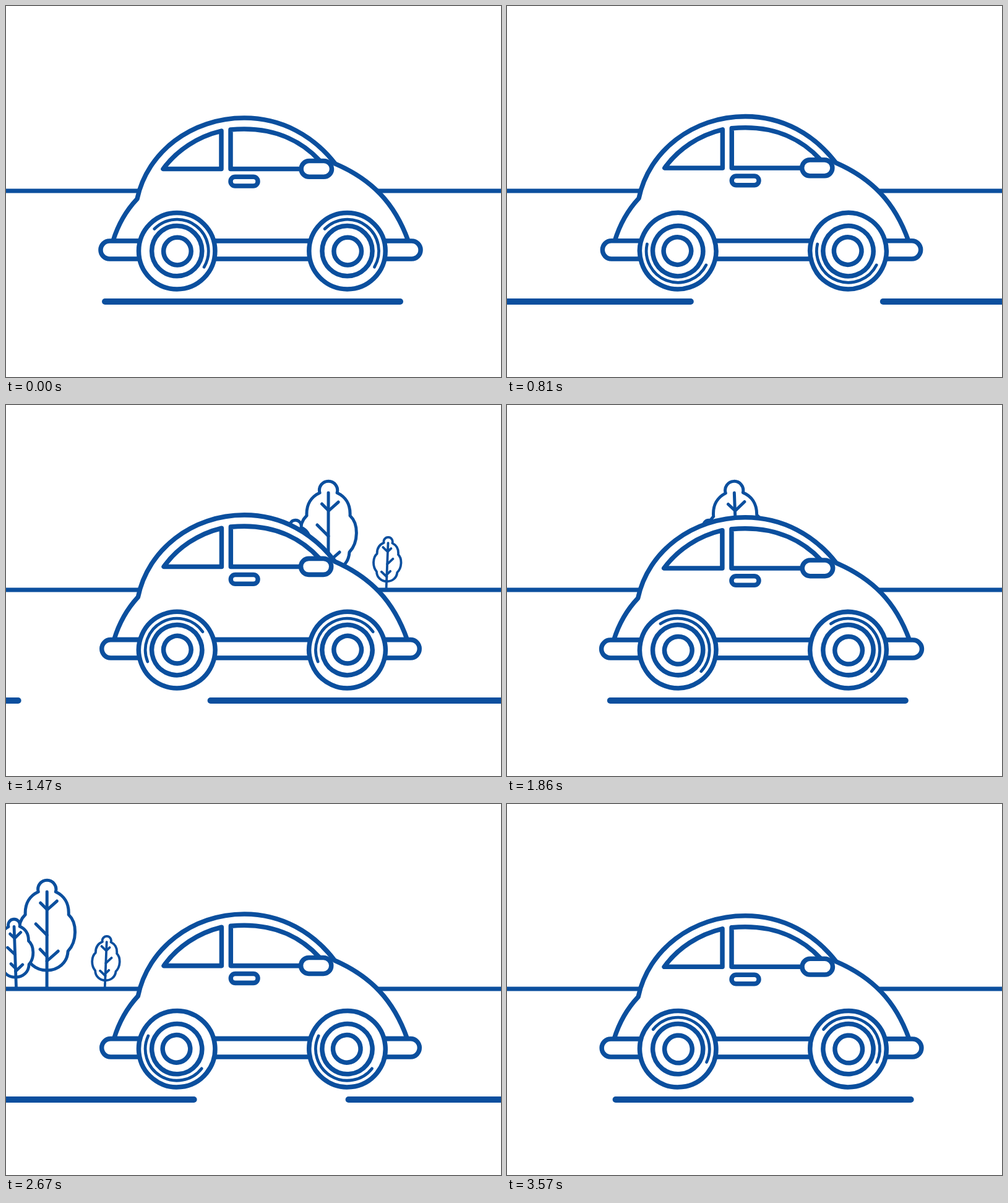
An HTML page that plays this animation: 800x600 px, repeating every 3.6 s.

```html
<!DOCTYPE html>
<html lang="en">
<head>
<meta charset="utf-8">
<title>Driving car</title>
<style>
  html, body { margin: 0; width: 100%; height: 100%; overflow: hidden; background: #fff; }
  svg { display: block; width: 100vw; height: 100vh; }
  .ink { fill: none; stroke: #0b4f9e; stroke-width: 7.5; stroke-linecap: round; stroke-linejoin: round; }
  .solid { fill: #fff; }
  .road { stroke-width: 10; }
</style>
</head>
<body>
<svg viewBox="0 0 800 600" class="ink">
  <defs>
    <path id="crown" class="solid" vector-effect="non-scaling-stroke"
      d="M-14 142A14.6 14.6 0 1 1 14 142C27 148 36 160 35 179C49 192 49 222 34 238C33 257 18 269 0 269C-18 269 -33 257 -34 238C-49 222 -49 192 -35 179C-36 160 -27 148 -14 142Z"/>
    <path id="twigs" vector-effect="non-scaling-stroke"
      d="M-10.5 160L.5 171L16 157M-18 194L0 212M-11 235L0 246.5M18 238L0 254"/>
    <g id="wheel">
      <circle class="solid" r="61.7"/>
      <circle r="40.6"/>
      <circle r="22.3" cx=".7" cy=".4"/>
      <path stroke-width="4.8" d="M-36.4 -35.7A51 51 0 0 1 43.9 26"/>
    </g>
  </defs>
  <path d="M-10 299H810" stroke-width="7"/>
  <g id="trees"></g>
  <g id="car">
    <path class="solid" d="M173 380C181 354 194 331 212 312C228 236 300 181 385 181C446 181 497 210 532 255C590 280 628 318 650 380Z"/>
    <rect class="solid" x="153" y="380" width="517" height="29" rx="14.5"/>
    <path d="M254 263.5H348V202C310 211 276 233 254 263.5Z"/>
    <path d="M507 250C480 221 440 199 385 199Q374 199 363 200V263.5H477"/>
    <rect class="solid" x="477" y="250.5" width="49.5" height="25.7" rx="12.85"/>
    <rect x="363" y="276.3" width="44" height="14.6" rx="7.3"/>
  </g>
  <use class="wheel" href="#wheel"/>
  <use class="wheel" href="#wheel"/>
  <g id="road" class="road"></g>
</svg>
<script>
const LOOP = 3600, STEP = 30;
const GROUND = 299;
const TREE_SPEED = 0.379, ROAD_SPEED = 0.42;
const DASH = 477;
const AXLES = [276.2, 551.5];
const DASHES = [160, 948, 1675];

// x: start position, size: scale, top: crown top, lean/swing: degrees
const TREES = [
  { x: 1078, size: 1, flip: 1, top: 123, pen: 5, lean: -0.48, swing: 1.62 },
  { x: 1028.5, size: 0.645, flip: 1, top: 186, pen: 4.8, lean: -1.07, swing: -2.72 },
  { x: 1171.6, size: 0.49, flip: -1, top: 213.7, pen: 3.8, lean: 1.49, swing: 2.39 }
];

const $ = id => document.getElementById(id);

function add(parent, tag, attrs) {
  const el = document.createElementNS("http://www.w3.org/2000/svg", tag);
  for (const key in attrs) el.setAttribute(key, attrs[key]);
  return parent.appendChild(el);
}

const place = (el, value) => el.setAttribute("transform", value);
const ease = u => (1 - Math.cos(Math.PI * Math.min(1, Math.max(0, u)))) / 2;

for (const tree of TREES) {
  const { size, flip, top, pen } = tree;
  const fit = `translate(0 ${top - 123 * size}) scale(${size * flip} ${size})`;
  tree.el = add($("trees"), "g", { "stroke-width": pen });
  add(tree.el, "use", { href: "#crown", transform: fit });
  add(tree.el, "path", { d: `M0 ${top + 19 * size}V${GROUND}` });
  add(tree.el, "use", { href: "#twigs", transform: fit });
}

const dashes = DASHES.map(() => add($("road"), "path", { d: `M0 478h${DASH}` }));
const wheels = document.querySelectorAll(".wheel");

// Height of the roof line: sinks to 183.5, springs up to 177.5, rests, sinks again
function roofAt(t) {
  const p = (t / 1800) % 1;
  const q = p < 0.2 ? p + 1 : p;
  const sunk = q < 0.74 ? 1 - ease((q - 0.2) / 0.35) : ease((q - 0.74) / 0.46);
  return 177.5 + 6 * sunk;
}

function draw(t) {
  const sway = Math.cos(2 * Math.PI * t / 1200 - 0.19);
  for (const { el, x, lean, swing } of TREES) {
    place(el, `translate(${x - TREE_SPEED * t} 0) rotate(${lean + swing * sway} 0 ${GROUND})`);
  }

  const sy = (409 - roofAt(t)) / 228;
  const sx = 1 - (sy - 1) / 2;
  place($("car"), `translate(411.5 409) scale(${sx} ${sy}) translate(-411.5 -409)`);

  wheels.forEach((el, i) => place(el, `translate(${AXLES[i]} 396.2) rotate(${t * 0.2})`));
  dashes.forEach((el, i) => place(el, `translate(${DASHES[i] - ROAD_SPEED * t} 0)`));
}

const start = performance.now();
function tick() {
  const t = (performance.now() - start) % LOOP;
  draw(Math.floor(t / STEP) * STEP);
  requestAnimationFrame(tick);
}
draw(0);
requestAnimationFrame(tick);
</script>
</body>
</html>
```
